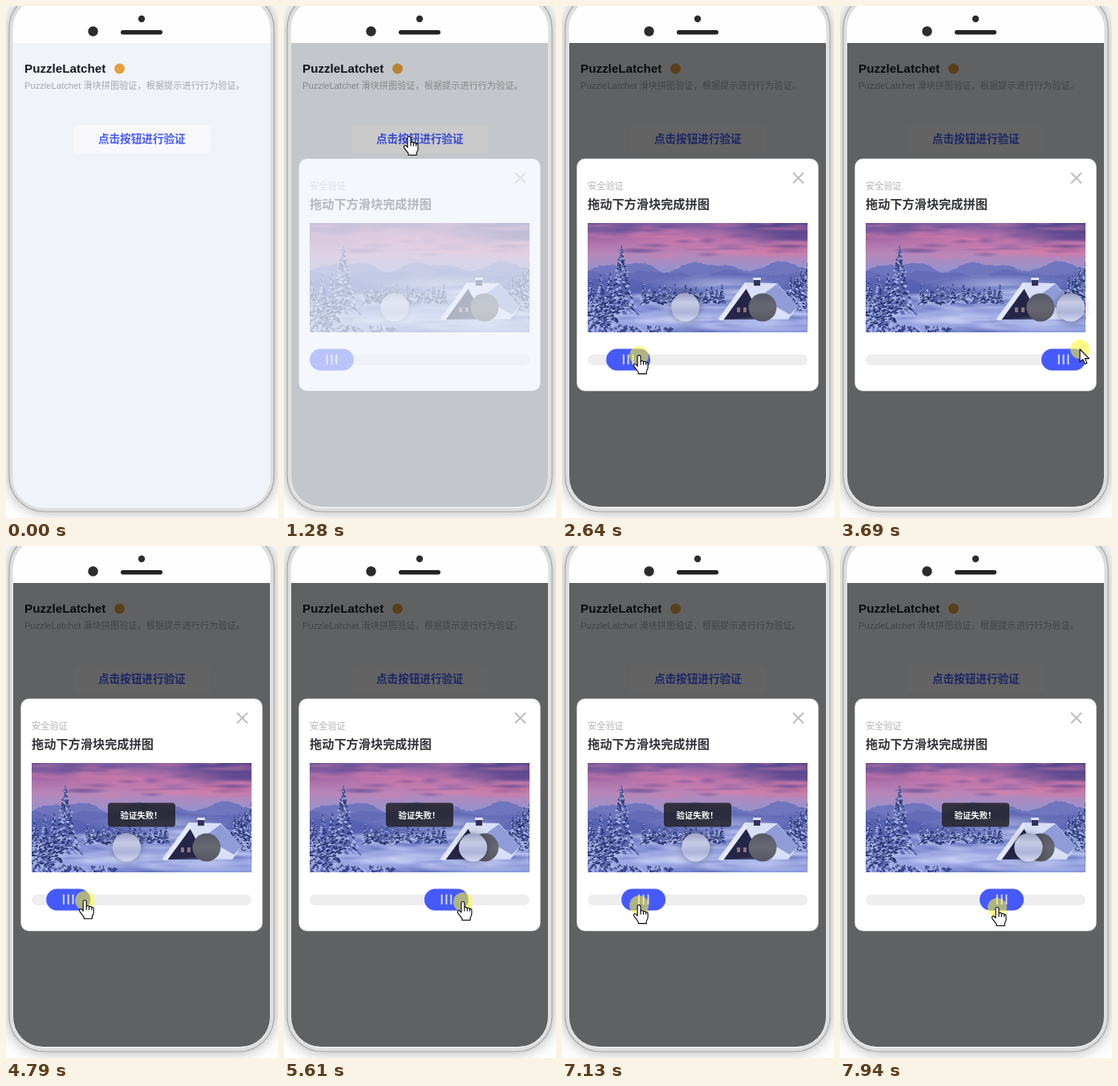
An HTML page with a canvas for the animation above (8000 ms loop, 339 by 637 pixels).

```html
<!DOCTYPE html>
<html lang="zh">
<head>
<meta charset="utf-8">
<title>滑块验证</title>
<style>
  html, body { margin: 0; width: 100%; height: 100%; overflow: hidden; background: #fff; }
  canvas { display: block; width: 339px; height: 637px; }
</style>
</head>
<body>
<canvas id="stage"></canvas>
<script>
const W = 339, H = 637, LOOP = 8000;
const FONT = '"Liberation Sans", "Noto Sans CJK SC", "Noto Sans CJK", sans-serif';
const BG = '#f0f4f9', BLUE = '#465afc';
const PIC = { x: 32, y: 270, w: 274, h: 136 };
const dpr = window.devicePixelRatio || 1;

function makeContext(canvas, w, h, scale) {
  canvas.width = w * scale;
  canvas.height = h * scale;
  const c = canvas.getContext('2d');
  c.scale(scale, scale);
  return c;
}
const screen2d = makeContext(document.getElementById('stage'), W, H, dpr);
let ctx = screen2d;

// Each stroke eases the pointer from where it rests to a new place.
const ENTRY = { x: 212, y: 357 };
const STROKES = [
  { from: 460, to: 1210, x: 156, y: 163 },
  { from: 1620, to: 2370, x: 73, y: 436 },
  { from: 2424, to: 3520, x: 299, y: 427 },
  { from: 3930, to: 4590, x: 80, y: 441 },
  { from: 4725, to: 4945, x: 164, y: 442 },
  { from: 5180, to: 5600, x: 223, y: 443 },
  { from: 5600, to: 5950, x: 197, y: 444.5 },
  { from: 6320, to: 6780, x: 54, y: 446 },
  { from: 6850, to: 7540, x: 170, y: 449 },
  { from: 7670, to: 7940, x: 196, y: 450 }
];
const DRAGS = [
  { down: 2360, up: 3930, grip: 73 },
  { down: 4650, up: 6188, grip: 80 },
  { down: 6815, up: LOOP, grip: 54 }
];
const RETURN_MS = 400, MAX_SLIDE = 219, FADE_MS = 200;

const clamp = (v, a = 0, b = 1) => Math.min(b, Math.max(a, v));
const ramp = (t, start, ms) => clamp((t - start) / ms);
const smooth = u => u * u * (3 - 2 * u);

// Standard "ease" timing curve, cubic-bezier(.25, .1, .25, 1).
function ease(x) {
  let lo = 0, hi = 1;
  for (let i = 0; i < 20; i++) {
    const s = (lo + hi) / 2;
    const bx = .75 * s * (1 - s) ** 2 + .75 * s * s * (1 - s) + s ** 3;
    if (bx < x) lo = s; else hi = s;
  }
  return .3 * lo * (1 - lo) ** 2 + 3 * lo * lo * (1 - lo) + lo ** 3;
}

function pointer(t) {
  let { x, y } = ENTRY;
  for (const s of STROKES) {
    const u = smooth(ramp(t, s.from, s.to - s.from));
    x += (s.x - x) * u;
    y += (s.y - y) * u;
  }
  return { x, y };
}

const lastDrag = t => DRAGS.filter(d => t >= d.down).pop();
const heldSlide = (d, t) => d ? clamp(pointer(t).x - d.grip, 0, MAX_SLIDE) : 0;
function slideAt(t) {
  const d = lastDrag(t);
  if (!d || t < d.up) return heldSlide(d, t);
  return heldSlide(d, d.up) * (1 - ease(ramp(t, d.up, RETURN_MS)));
}

// A failed release shows the message for two seconds.
function toastAt(t) {
  const d = DRAGS.filter(d => t >= d.up + 90).pop();
  if (!d) return 0;
  return ramp(t, d.up + 90, FADE_MS) * (1 - ramp(t, d.up + 2090, FADE_MS));
}

function overHandle(x, y, slide) {
  const cx = clamp(x, 45.5 + slide, 73.5 + slide);
  return Math.hypot(x - cx, y - 440) < 13.5;
}

function box(x, y, w, h, r, fill) {
  ctx.beginPath();
  ctx.roundRect(x, y, w, h, r);
  if (fill) { ctx.fillStyle = fill; ctx.fill(); }
}
function blob(x, y, rx, ry, tilt, fill) {
  ctx.beginPath();
  ctx.ellipse(x, y, rx, ry, tilt, 0, Math.PI * 2);
  ctx.fillStyle = fill;
  ctx.fill();
}
const disc = (x, y, r, fill) => blob(x, y, r, r, 0, fill);
function poly(fill, ...points) {
  ctx.beginPath();
  for (const [x, y] of points) ctx.lineTo(x, y);
  ctx.closePath();
  ctx.fillStyle = fill;
  ctx.fill();
}
function fade(y0, y1, ...colors) {
  const g = ctx.createLinearGradient(0, y0, 0, y1);
  colors.forEach((c, i) => g.addColorStop(i / (colors.length - 1), c));
  return g;
}
// Soft round patch of colour, flattened to an oval.
function glow(x, y, rx, ry, rgb, alpha = 1) {
  ctx.save();
  ctx.translate(x, y);
  ctx.scale(rx, ry);
  const g = ctx.createRadialGradient(0, 0, 0, 0, 0, 1);
  g.addColorStop(0, `rgba(${rgb},${alpha})`);
  g.addColorStop(1, `rgba(${rgb},0)`);
  disc(0, 0, 1, g);
  ctx.restore();
}
function label(text, x, y, size, weight, color, align = 'left') {
  ctx.font = `${weight} ${size}px ${FONT}`;
  ctx.textAlign = align;
  ctx.fillStyle = color;
  ctx.fillText(text, x, y);
}

function phone() {
  ctx.fillStyle = '#fff';
  ctx.fillRect(0, 0, W, H);
  ctx.save();
  ctx.shadowColor = 'rgba(0,0,0,.35)';
  ctx.shadowBlur = 18 * dpr;
  box(4, -16, 330, 645, 44, '#dedede');
  ctx.restore();
  ctx.strokeStyle = '#a9a9a9';
  ctx.lineWidth = 1.2;
  ctx.stroke();
  box(8.5, -10, 321, 634.5, 38, '#f4f4f4');
  ctx.save();
  box(9, -9, 320, 632, 37, '#fefefe');
  ctx.clip();
  ctx.fillStyle = BG;
  ctx.fillRect(0, 46, W, 580);
  ctx.restore();
  disc(108.5, 31.5, 6.2, '#2c2c2c');
  disc(169, 16, 4.2, '#2c2c2c');
  box(143, 30, 52, 5.4, 2.7, '#242424');
}

function page() {
  label('PuzzleLatchet', 23, 83, 15.2, 'bold', '#17191f');
  disc(141.5, 78, 6.5, '#e2a03f');
  label('PuzzleLatchet 滑块拼图验证，根据提示进行行为验证。', 23, 103, 11.2, 'normal', '#a4a6a9');
  box(84, 148, 170.5, 35, 5, '#f8f8fa');
  label('点击按钮进行验证', 169.3, 170, 13.6, 'bold', BLUE, 'center');
}

function dim(p) {
  ctx.save();
  box(9, -9, 320, 632, 37);
  ctx.clip();
  ctx.fillStyle = `rgba(0,0,0,${.6 * p})`;
  ctx.fillRect(9, 46, 320, 580);
  ctx.restore();
}

function seeded(seed) {
  return () => (seed = (seed * 16807) % 2147483647) / 2147483647;
}

// The winter scene, painted once in its own 274 by 136 space.
function paintScene() {
  const { w, h } = PIC, rand = seeded(71);
  const canvas = document.createElement('canvas');
  ctx = makeContext(canvas, w, h, 1);

  ctx.fillStyle = fade(0, 75, '#7a5c9f', '#a96aa6', '#b986b8', '#9a92cb', '#7d88c6');
  ctx.fillRect(0, 0, w, h);
  glow(w, 0, 110, 38, '58,56,130', .95);
  glow(0, 0, 80, 24, '96,78,150', .6);
  glow(115, 22, 90, 18, '208,124,172', .75);
  glow(245, 33, 75, 13, '214,118,160', .9);
  for (let i = 0; i < 60; i++) {
    const tone = i % 2 ? '88,70,146' : '216,128,172';
    glow(rand() * w, rand() * 42, 12 + rand() * 30, 2 + rand() * 3, tone, .45);
  }

  // Mountain ridges, nearer ones lower and darker.
  for (let k = 0; k < 3; k++) {
    const ridge = [[0, h]];
    for (let x = 0; x <= w; x += 3) {
      const peak = Math.abs(Math.sin(x / 31 + k * 2)) * 11 + Math.sin(x / 9 + k) * 2.5;
      ridge.push([x, 60 + k * 7 - peak * (1 - k * .25) + rand() * 2]);
    }
    poly(`rgb(${112 - k * 12},${118 - k * 10},${190 - k * 6})`, ...ridge, [w, h]);
  }
  glow(165, 76, 95, 12, '176,182,226', .85);

  // Snowfield with drifting bands of light and shade.
  const snow = [[0, h]];
  for (let x = 0; x <= w; x += 4) snow.push([x, 85 + 7 * Math.sin(x / 50 + 1)]);
  poly(fade(78, h, '#7c88cb', '#7481c8', '#a5b1e8', '#8c99dc'), ...snow, [w, h]);
  for (let i = 0; i < 70; i++) {
    const y = 82 + rand() * 54, lit = rand() < .55;
    glow(rand() * w, y, 14 + rand() * 30, 2 + rand() * 4, lit ? '206,214,248' : '82,94,178', .5);
  }
  glow(105, 118, 65, 9, '208,216,250', .85);

  // A conifer: dabs of needles and snow that widen downwards.
  const tree = (x, top, base, width) => {
    const count = (base - top) * 3;
    for (let i = 0; i < count; i++) {
      const u = i / count, side = rand() - .5, tier = .6 + .4 * ((u * 8) % 1);
      const tone = rand() < .3 ? '#aab6e6' : rand() < .4 ? '#5664ac' : '#28346e';
      blob(x + side * width * u * tier, top + u * (base - top), .6 + u * 2.2, 1.1, side * 1.4, tone);
    }
  };
  for (let i = 0; i < 16; i++) tree(70 + i * 6.5, 76 + rand() * 10, 95 + rand() * 6, 9);
  for (let i = 0; i < 4; i++) tree(w - i * 7, 50 + i * 6, 108, 26 - i * 3);
  for (let i = 0; i < 3; i++) tree(4 + i * 12, 70 - i * 4, 128, 28);
  tree(42, 29, 114, 44);

  // Hut: dark gable under a thick snow roof.
  poly('#d9dff8', [162, 120], [196, 74], [236, 75], [262, 104], [250, 120]);
  poly('#8f9cd8', [214, 92], [236, 76], [262, 104], [252, 114]);
  poly('#252547', [168, 120], [196, 79], [218, 120]);
  poly('#e4e9fc', [164, 121], [196, 74], [199, 80], [169, 121]);
  box(207, 70, 8, 8, 0, '#33315c');
  box(206, 68, 10, 3, 1, '#dfe4f8');
  for (let i = 0; i < 3; i++) box(186 + i * 8, 105, 4, 6, 0, '#8d7482');
  glow(225, 126, 70, 10, '190,200,242', .9);

  // Frosted scrub along the lower edge.
  for (let i = 0; i < 110; i++) {
    const x = rand() * 105;
    blob(x, h - rand() * 7, 2.5, 1, rand() * 3, i % 3 ? '#3a4788' : '#a9b4e4');
  }
  ctx = screen2d;
  return canvas;
}
const scene = paintScene();

function puzzle(slide) {
  disc(250, 375, 17.5, fade(357, 393, '#555866', '#666871', '#55565f'));
  const x = 138 + slide * .6826;
  ctx.save();
  ctx.shadowColor = 'rgba(0,0,0,.35)';
  ctx.shadowBlur = 10 * dpr;
  disc(x, 375, 17.5, '#b9bfdf');
  ctx.restore();
  disc(x, 375, 17.5, fade(357, 393, '#9a9fc4', '#c6cbe4', '#aeb4d8', '#d5daf2'));
}

function slider(slide) {
  box(32, 433.5, 274, 13.5, 6.75, '#eeeeee');
  box(32 + slide, 426.5, 55, 27, 13.5, BLUE);
  for (let i = -1; i <= 1; i++) box(58.6 + slide + i * 5.8, 433.5, 1.9, 12.5, .5, '#dce1ff');
}

function popup(p, slide, toast) {
  const panel = fill => box(18.5, 190, 301, 289, 10, fill);
  panel('#fff');
  ctx.strokeStyle = 'rgba(190,190,190,.5)';
  ctx.lineWidth = 1;
  ctx.stroke();
  label('安全验证', 32, 227.5, 11.2, 'normal', '#b0b1b6');
  label('拖动下方滑块完成拼图', 32, 251.5, 15.2, 'bold', '#33343a');
  ctx.strokeStyle = '#bcbcbc';
  ctx.lineWidth = 2;
  for (const s of [-6.5, 6.5]) {
    ctx.beginPath();
    ctx.moveTo(294.5 - s, 207.5);
    ctx.lineTo(294.5 + s, 220.5);
    ctx.stroke();
  }
  ctx.drawImage(scene, PIC.x, PIC.y, PIC.w, PIC.h);
  puzzle(slide);
  slider(slide);
  ctx.globalAlpha = toast;
  box(127, 319.5, 84, 30, 4, 'rgba(32,32,38,.84)');
  label('验证失败！', 142.5, 338.5, 10.4, 'bold', '#fff');
  // A veil in the page colour fades the whole panel evenly.
  ctx.globalAlpha = 1 - p;
  panel(BG);
  ctx.globalAlpha = 1;
}

const ARROW = new Path2D('M0 0V16L3.7 12.6L6.3 18.4L8.8 17.3L6.3 11.6H11.4Z');
const HAND = new Path2D('M-2 1.2Q-2-.5 0-.5Q2-.5 2 1.2V6.8Q4.4 5.6 5.4 7.6Q7.8 6.4 8.6 8.6' +
  'Q11 7.6 11 10.4V15Q11 17 9.2 19.4V22.5H-1V20.4L-6.2 13.6Q-7.2 11-5.6 10.4Q-4 10-2 13Z');
const KNUCKLES = new Path2D('M2 7V11.5M5.4 8V11.5M8.6 9V11.5');

function cursor(x, y, hand) {
  const shape = hand ? HAND : ARROW;
  ctx.save();
  ctx.translate(x, y);
  ctx.fillStyle = '#fff';
  ctx.strokeStyle = '#000';
  ctx.lineWidth = 1.1;
  ctx.lineJoin = 'round';
  ctx.fill(shape);
  ctx.stroke(shape);
  if (hand) ctx.stroke(KNUCKLES);
  ctx.restore();
}

function draw(t) {
  phone();
  page();
  const p = ramp(t, 1225, 180), slide = slideAt(t);
  if (p > 0) {
    dim(p);
    popup(p, slide, toastAt(t));
  }
  if (t < STROKES[0].from) return;
  const { x, y } = pointer(t), drag = lastDrag(t);
  const onButton = t < STROKES[1].from && x > 84 && x < 254 && y > 148 && y < 183;
  // The pointer shape only refreshes once the mouse moves again.
  const grabbed = drag && t < drag.up + 140;
  const onHandle = p > 0 && overHandle(x, y, grabbed ? heldSlide(drag, t) : slide);
  const pressed = (t > 1130 && t < 1225) || (drag && t < drag.up);
  if (pressed) disc(x, y, 12, 'rgba(255,250,40,.56)');
  cursor(x, y, onButton || onHandle);
}

const start = performance.now();
function tick() {
  draw((performance.now() - start) % LOOP);
  requestAnimationFrame(tick);
}
tick();
</script>
</body>
</html>
```
